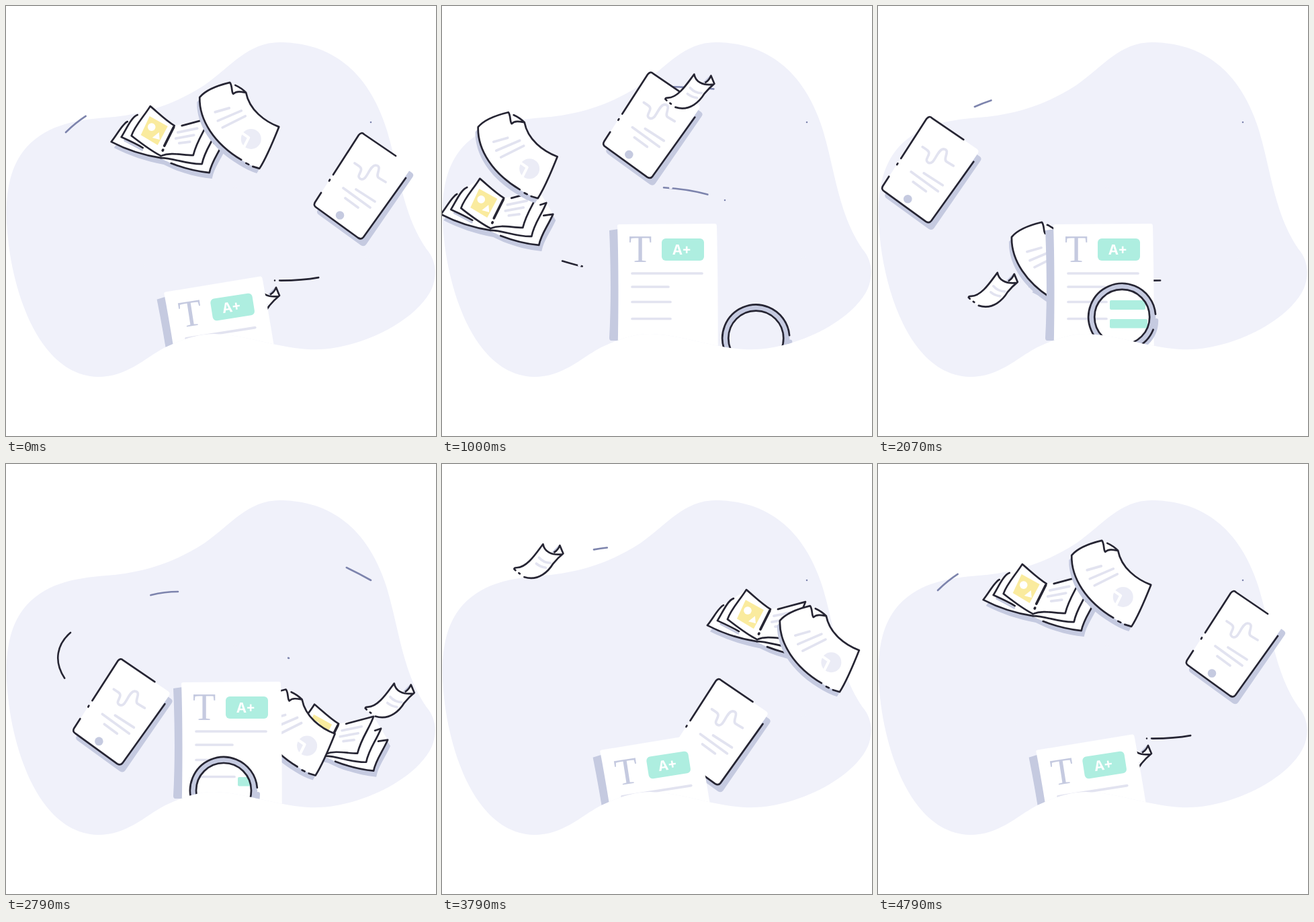
Write an HTML page that moves like this. It is 640x640 px and loops after 4870 ms.

```html
<!DOCTYPE html>
<html lang="en">
<head>
<meta charset="utf-8">
<title>Study desk</title>
<style>
  html, body { margin: 0; width: 100%; height: 100%; overflow: hidden; background: #fff; }
  svg { display: block; width: 100vw; height: 100vh; }
  path, line, circle { stroke-linecap: round; stroke-linejoin: round; }
  .ink { fill: none; stroke: #262533; stroke-width: 2.7; }
  .white { fill: #fff; }
  .shade { fill: #c5cae0; }
  .rule { fill: none; stroke: #e2e3f0; stroke-width: 3.7; }
  .mint { fill: #aeeee0; }
</style>
</head>
<body>
<svg viewBox="0 0 640 640">
  <defs>
    <path id="blob" d="M408 54C500 55 545 115 567 185C585 245 590 310 626 362C640 378 642 400 634 420C612 470 520 515 450 511C400 508 360 490 310 488C280 488 255 500 237 508C205 525 180 552 137 552C60 550 20 455 6 370C-3 310 -3 255 25 217C55 178 100 170 150 166C200 162 245 150 295 118C335 90 360 54 408 54Z"/>
    <clipPath id="inBlob"><use href="#blob"/></clipPath>
    <clipPath id="inLens"><circle id="lensHole" r="41"/></clipPath>
    <path id="bookShape" d="M157 202C166 191 172 176 181 172L215 149L251 178L303 167L314 185L324 202C316 220 306 232 303 248C283 246 264 241 246 234L231 227C205 222 180 214 157 202Z"/>
    <path id="sheetShape" d="M333 114C312 119 297 125 288 136C287 170 310 205 350 229Q364 238 377 242C388 225 398 200 406 180C385 172 362 155 357 129Q350 122 341 118Z"/>
    <path id="tabletShape" d="M533 191L600 237Q604 240 601 244L532 344Q529 348 524 345L462 300Q457 297 460 292L525 192Q529 187 533 191Z"/>
  </defs>

  <use href="#blob" fill="#f0f1fa"/>
  <g id="trails" fill="none" stroke-width="2.6"></g>
  <path d="M204 386h1M537.5 375.500l2-1.500M340 270.500h1" stroke="#f0f1fa" stroke-width="4"/>

  <g id="book">
    <use href="#bookShape" class="shade" x="4" y="9"/>
    <use href="#bookShape" class="white"/>
    <path d="M177 200L203 214" stroke="#c5cae0" stroke-width="3"/>
    <path class="ink" d="M181 172C174 175 166 191 157 202C180 214 205 222 231 226M196 162C187 165 179 184 172 195C183 200 194 205 204 211M310 204L324 202C316 220 306 232 303 248C283 246 264 241 246 234"/>
    <path class="ink white" style="fill:#fff" d="M305 188L314 185C307 203 296 215 292 235C270 236 250 226 231 226"/>
    <path class="white" d="M251 180L303 167C297 185 285 198 279 222C262 222 247 217 231 223Z"/>
    <path class="ink" d="M262 178L303 167C297 185 285 198 279 222C262 222 247 217 231 223"/>
    <path class="ink" style="fill:#fff" d="M251 178C238 170 226 158 215 149C205 165 192 178 187 193C200 203 215 215 231 223"/>
    <path class="ink" style="stroke-width:3.7" d="M250 180L236 208M234 214l-.5 1"/>
    <path d="M214 164L241 179L226 207L201 192Z" fill="#faeb9e"/>
    <path class="white" d="M218 196L228 188L229 199Z"/>
    <circle class="white" cx="217" cy="180" r="5.800"/>
    <path class="rule" d="M256 188L285 182M253 197L280 192M258 204L274 202"/>
  </g>

  <g id="sheet">
    <use href="#sheetShape" class="shade" x="-4" y="7"/>
    <use href="#sheetShape" class="white"/>
    <path class="ink" d="M350 229C310 205 287 170 288 136C297 125 312 119 333 114C337 119 335 128 338 131C343 126 351 128 357 129C362 155 385 172 406 180C398 200 388 225 377 242L367 239M357 234L361 236M341 118Q350 122 357 129"/>
    <path class="rule" d="M311 158L332 152M315 171L350 156M322 181L356 164"/>
    <circle cx="364.500" cy="198" r="15" fill="#ebecf6"/>
    <path d="M348 187L361 196L353 212" fill="none" stroke="#fff" stroke-width="4"/>
  </g>

  <g id="tablet">
    <use href="#tabletShape" class="shade" x="4" y="11"/>
    <use href="#tabletShape" class="white"/>
    <path class="ink" d="M580 223L533 191Q529 187 525 192L487 251M482 258.500l-1 1.800M469 278L460 292Q457 297 462 300L524 345Q529 348 532 344L595 256"/>
    <path class="rule" d="M519 234L525 238C535 244 520 252 527 257C537 263 540 238 550 237C562 238 548 252 555 256L565 262M521 273L549 291M502 271L542 300M505 286L524 300"/>
    <circle class="shade" cx="497" cy="311.500" r="6.300"/>
  </g>

  <g id="note">
    <path class="white" d="M551 201C543 211 528 236 512 236Q508 236 508 238Q514 246 523 250C545 257 560 240 566 230C571 224 576 219 581 215L576 203L568 213Q555 212 551 201Z"/>
    <path class="shade" d="M564 213L575 202L569 214Z"/>
    <path class="ink" d="M523 250C545 257 560 240 566 230C571 224 576 219 581 215L576 203Q573 210 568 213M580 216C563 218 553 212 551 201C543 211 528 236 512 236Q508 236 508 238L510 240M515 244l1.500 1"/>
    <path class="rule" d="M545 221Q552 229 562 229M541 230Q547 235 555 236"/>
  </g>

  <g clip-path="url(#inBlob)">
    <g id="paper">
      <path class="shade" d="M249 334L263 332V498H252Q249 498 249 494C252 440 251 380 249 334Z"/>
      <path class="white" d="M261 327Q261 325 264 325L406 324Q409 324 409 328C410 370 411 420 411 540H261C263 460 263 380 261 327Z"/>
      <text class="shade" x="278" y="381" font-size="56" font-family="Liberation Serif, serif">T</text>
      <rect class="mint" x="327" y="346" width="63" height="33" rx="6"/>
      <text class="white" x="357" y="369.500" font-size="20.500" font-weight="700" text-anchor="middle" font-family="Inter, sans-serif">A+</text>
      <path class="rule" d="M283 398H387M283 418H337M283 440.500H340M283 465.500H340"/>
    </g>
    <g clip-path="url(#inLens)">
      <rect class="white" x="400" y="325" width="21" height="220"/>
      <rect class="mint" x="345" y="438" width="53" height="14" rx="2"/>
      <rect class="mint" x="345" y="466" width="56" height="13.500" rx="2"/>
    </g>
    <g id="lens" fill="none">
      <circle cx="4" cy="5" r="47" stroke="#c5cae0" stroke-width="6" pathLength="360" stroke-dasharray="100 260"/>
      <circle r="45.500" stroke="#c5cae0" stroke-width="9"/>
      <circle class="ink" r="41"/>
      <circle class="ink" r="50" pathLength="360" stroke-dasharray="333 27" transform="rotate(22)"/>
    </g>
  </g>
</svg>
<script>
const FPS = 14, LOOP = 4870, TURN = 67, LAP = TURN / 2;
const INK = '#262533', HAZE = '#7d84ad';
const $ = id => document.getElementById(id);

// Closed tracks, points evenly spaced in time
const inner = [[528,268],[468,216],[396,193],[320,178],[239,182],[165,185],[90,214],[75,279],
  [117,343],[190,376],[266,392],[342,400],[421,398],[498,385],[554,338]];
const outer = [[370,444],[478,421],[572,351],[557,249],[475,168],[370,129],[256,122],[142,147],
  [72,222],[70,332],[132,406],[243,441]];

// home: where the drawing's anchor sits; lead: head start in steps
const riders = [
  { id: 'book', track: inner, turn: TURN, lead: 18, home: [237, 182] },
  { id: 'sheet', track: inner, turn: TURN, lead: 13.5, home: [318, 178] },
  { id: 'tablet', track: inner, turn: TURN, lead: 0, home: [528, 268] },
  { id: 'note', track: outer, turn: LAP, lead: 0, home: [544, 228] }
];

// keys: [steps since start, tail, head] as parts of the line
const trails = [
  { d: 'M543 173C490 143 440 124 383 122C320 118 270 120 222 128C170 136 125 152 89 188', color: HAZE, start: 4.3,
    keys: [[0,0,0],[1.2,0,.085],[4.7,0,.35],[10.2,.34,.5],[15.7,.67,.7],[20.2,.69,.72],[29.2,.92,1],[32,1,1]] },
  { d: 'M421 289C400 281 370 272 324 270', color: HAZE, start: 5.3,
    keys: [[0,0,0],[.2,0,.01],[3.7,0,.35],[9.2,.3,1],[13,1,1]] },
  { d: 'M256 190C240 190 228 192 216 195L190 202', color: HAZE, start: 4,
    keys: [[0,0,0],[1.5,0,.61],[5,.2,1],[9,1,1]] },
  { d: 'M96 251C76 268 70 294 88 320C108 350 140 368 174 378C188 382 200 386 212 388', color: INK, start: 4,
    keys: [[0,0,0],[1.5,0,.34],[5,.1,.82],[10.5,.92,1],[12,1,1]] },
  { d: 'M400 408.500C430 409 450 407 466 404C500 398 525 388 547 369', color: INK, start: 27,
    keys: [[0,0,0],[6.5,.045,.42],[12,.5,.85],[15.5,.9,1],[17,1,1]] }
];
const lensKeys = [[4,620,600],[9,548,536],[16,435,478],[20,404.5,461],[26,375,456],[39,324,486],[46,310,570]];

for (const trail of trails) {
  trail.el = document.createElementNS('http://www.w3.org/2000/svg', 'path');
  trail.el.setAttribute('d', trail.d);
  trail.el.setAttribute('stroke', trail.color);
  $('trails').append(trail.el);
  trail.length = trail.el.getTotalLength();
}

const mod = (a, n) => (a % n + n) % n;

function ease(from, to, x) {
  const s = Math.min(1, Math.max(0, (x - from) / (to - from)));
  return s * s * (3 - 2 * s);
}

function tween(keys, x) {
  if (x <= keys[0][0]) return keys[0].slice(1);
  const i = keys.findIndex(key => key[0] > x);
  if (i < 0) return keys[keys.length - 1].slice(1);
  const a = keys[i - 1], b = keys[i], s = (x - a[0]) / (b[0] - a[0]);
  return a.slice(1).map((v, j) => v + (b[j + 1] - v) * s);
}

// Catmull-Rom position on a closed track, u from 0 to 1
function along(track, u) {
  const n = track.length, i = Math.floor(u * n), s = u * n - i;
  const [p, a, b, q] = [-1, 0, 1, 2].map(j => track[mod(i + j, n)]);
  return [0, 1].map(c => a[c] + s / 2 * (b[c] - p[c]
    + s * (2 * p[c] - 5 * a[c] + 4 * b[c] - q[c] + s * (3 * (a[c] - b[c]) + q[c] - p[c]))));
}

function draw(time) {
  const step = Math.min(TURN, Math.floor((time % LOOP + 5) * FPS / 1000));

  for (const { id, track, turn, lead, home } of riders) {
    const [x, y] = along(track, mod(step + lead, turn) / turn);
    $(id).setAttribute('transform', `translate(${x - home[0]} ${y - home[1]})`);
  }

  for (const { el, keys, start, length } of trails) {
    const [tail, head] = tween(keys, mod(step - start, LAP));
    el.style.display = head > tail ? '' : 'none';
    el.setAttribute('stroke-dasharray', `0 ${tail * length} ${(head - tail) * length} 9999`);
  }

  const down = 1 - ease(2, 12, step) + ease(42, 52, step);
  $('paper').setAttribute('transform',
    `translate(${-26 * down} ${101 * down}) rotate(${-8.9 * down} 261 325)`);

  const [x, y] = tween(lensKeys, step);
  $('lens').setAttribute('transform', `translate(${x} ${y})`);
  $('lensHole').setAttribute('cx', x);
  $('lensHole').setAttribute('cy', y);
}

function tick() {
  draw(performance.now());
  requestAnimationFrame(tick);
}
tick();
</script>
</body>
</html>
```
